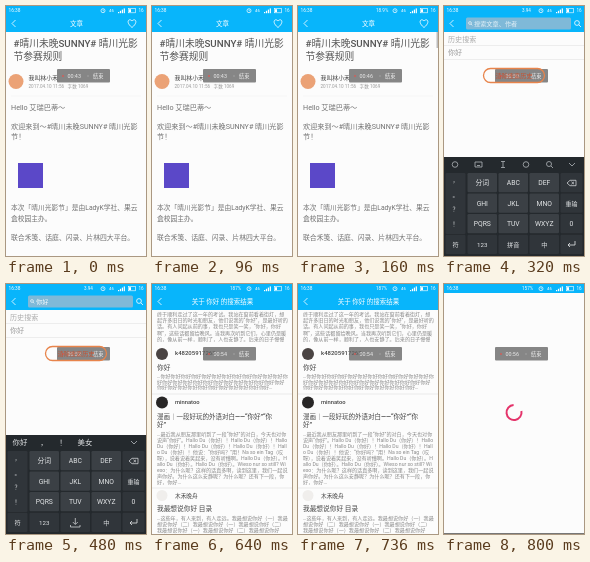
An HTML page that plays this animation: 140x250 px, repeating every 0.96 s.

```html
<!DOCTYPE html>
<html lang="zh-CN">
<meta charset="utf-8">
<title>阅读应用</title>
<style>
html, body { margin: 0; width: 100%; height: 100%; overflow: hidden; background: #fcfcfc; }
svg { display: block; width: 100%; height: 100%; }
text, p { font-family: Roboto, "Noto Sans CJK SC", "Noto Sans CJK", sans-serif; }
text { white-space: pre; }
p { margin: 0; color: #888; word-break: break-all; }
</style>
<svg id="stage" viewBox="0 0 140 250"></svg>
<script>
const STEP = 160;
const BLUE = '#08b5fb';

// y is the vertical middle of the line
const text = (x, y, str, size, fill = '#707070', more = '') =>
  `<text x="${x}" y="${y + size * 0.37}" font-size="${size}" fill="${fill}" ${more}>${str}</text>`;
const mid = (x, y, str, size, fill) => text(x, y, str, size, fill, 'text-anchor="middle"');
const strong = (x, y, str, size, fill = '#444') => text(x, y, str, size, fill, 'font-weight="500"');
const rect = (x, y, w, h, fill, more = '') =>
  `<rect x="${x}" y="${y}" width="${w}" height="${h}" fill="${fill}" ${more}/>`;
const circle = (x, y, r, fill, more = '') =>
  `<circle cx="${x}" cy="${y}" r="${r}" fill="${fill}" ${more}/>`;
const line = (d, color = '#fff', width = 0.8) =>
  `<path d="${d}" fill="none" stroke="${color}" stroke-width="${width}"/>`;
// Wrapped small print; y is the top of the block
const paragraph = (y, rows, pitch, str) =>
  `<foreignObject x="5" y="${y}" width="131" height="${rows * pitch}">
    <p style="font-size:5.1px;line-height:${pitch}px">${str}</p></foreignObject>`;

function statusBar(speed) {
  const bars = [0, 1, 2, 3].map(i => rect(112 + i * 1.9, 6 - i * 1.2, 1.2, 1.2 + i * 1.2, '#fff')).join('');
  return rect(0, 0, 140, 9, BLUE) +
    text(2.5, 4.7, '16:38', 4.8, '#fff') +
    text(78, 4.7, speed, 4.6, '#fff') +
    circle(97, 4.7, 2, 'none', 'stroke="#fff" stroke-width=".7"') + line('M97 3.4V4.8H98', '#fff', 0.5) +
    text(103, 4.7, '46', 4.4, '#fff') + bars +
    rect(122.4, 2.6, 7, 4.2, 'none', 'stroke="#fff" stroke-width=".6"') + rect(123, 3.2, 2, 3, '#fff') +
    text(132.5, 4.7, '16', 4.6, '#fff');
}

const backBar = () => rect(0, 9, 140, 17, BLUE) + line('M9.5 14L6 17.5L9.5 21');
const header = title => backBar() + mid(70.5, 17.3, title, 6.5, '#fff');

function toast(time) {
  return rect(51, 63, 53, 13.5, '#666', 'rx="1" opacity=".78"') +
    circle(57, 70, 0.9, '#d65b55') + text(61.5, 70, time, 5.4, '#eee') +
    line('M82 69V71', '#bbb', 0.5) + text(87, 70, '结束', 5.2, '#eee');
}

function article(time, speed, scrolling) {
  return statusBar(speed) + header('文章') +
    line('M126 21.5C119 16 123 11.5 126 15C129 11.5 133 16 126 21.5Z') +
    strong(7.5, 37, '#晴川未晚SUNNY# 晴川光影', 9.75, '#555') + strong(7.5, 50.7, '节参赛规则', 9.75, '#555') +
    circle(10, 75.5, 7.5, '#eba276') +
    strong(22.5, 72.3, '我叫林小禾', 5.9) +
    text(22.5, 79.8, '2017.04.10 11:56   字数 1069', 4.6, '#999') +
    line('M5 90H135', '#eee', 0.5) +
    text(5, 101, 'Hello 艾瑞巴蒂～', 7.2) +
    text(5, 120, '欢迎来到～#晴川未晚SUNNY# 晴川光影', 7.15) + text(5, 130.5, '节！', 7.15) +
    rect(12, 157, 25, 25, '#5b48c8') +
    text(5, 201.5, '本次「晴川光影节」是由LadyK学社、果云', 6.75) +
    text(5, 212.5, '盒校园主办。', 6.75) +
    text(5, 231.5, '联合禾笺、话庭、闪录、片林四大平台。', 6.85) +
    (scrolling ? rect(138.5, 26, 1.5, 16, '#bbb') : '') +
    toast(time);
}

function keyboard(typed) {
  const key = (x, y, w, h, fill = '#3b4045') => rect(x, y, w, h, fill, 'rx="1.2"');
  const label = (x, y, str, size = 6.8) => mid(x, y, str, size, '#e4e6e8');
  const letters = ['分词', 'ABC', 'DEF', 'GHI', 'JKL', 'MNO', 'PQRS', 'TUV', 'WXYZ'];
  let out = rect(0, 151, 140, 99, '#24292d');

  if (typed) {
    out += [[14, '你好'], [38, '，'], [57, '！'], [79, '美女']].map(([x, s]) => label(x, 158.5, s, 7.4)).join('') +
      line('M125 157L128 160L131 157', '#b8bcc0');
  } else {
    const icon = '#b0b5b9';
    out += circle(11, 158.5, 2.8, 'none', `stroke="${icon}" stroke-width=".8"`) +
      line('M31 156H38V161H31ZM33 159.5H36', icon) +
      line('M59 155.5V161.5M57 155.5H61M57 161.5H61', icon) +
      circle(82, 158.5, 2.8, 'none', `stroke="${icon}" stroke-width=".8"`) +
      circle(105, 158, 2.5, 'none', `stroke="${icon}" stroke-width=".8"`) + line('M107 160L109 162', icon) +
      line('M125 157L128 160L131 157', icon);
  }

  out += key(1.5, 167, 20, 61, '#30353a');
  ['，', '。', '？', '！'].forEach((s, i) => out += label(11.5, 174 + i * 14.5, s, 6));
  letters.forEach((s, i) => {
    const x = 23.5 + i % 3 * 31, y = 167 + Math.floor(i / 3) * 20.5;
    out += key(x, y, 29.5, 19.2) + label(x + 14.8, y + 9.8, s);
  });
  [0, 1, 2].forEach(i => out += key(116.5, 167 + i * 20.5, 22, 19.2, '#30353a'));
  out += line('M123 177L126 174.3H132V179.7H126ZM127.5 175.8L130 178.2M130 175.8L127.5 178.2', '#e4e6e8', 0.7) +
    label(127.5, 197.3, '重输', 6) + label(127.5, 217.8, '0');

  [[1.5, 20, '符'], [23.5, 29.5, '123'], [54.5, 29.5, typed ? '' : '拼音'], [85.5, 29.5, '中'], [116.5, 22, '']]
    .forEach(([x, w, s]) => out += key(x, 228.8, w, 19.2, '#30353a') + label(x + w / 2, 238.6, s, 6.2));
  if (typed) out += line('M69.3 234V240M66.8 238L69.3 240.5L71.8 238M64.5 241V243H74V241', '#e4e6e8', 0.7);
  return out + line('M131 235V239H124M126 237L124 239L126 241', '#e4e6e8');
}

function search(typed, time, speed) {
  return statusBar(speed) + backBar() +
    rect(22, 11.5, 105, 12, '#7fb9d8', 'rx="1.5"') +
    circle(26, 17, 1.4, 'none', 'stroke="#fff" stroke-width=".6"') + line('M27 18L28.3 19.4', '#fff', 0.6) +
    text(30, 17.3, typed ? '你好' : '搜索文章、作者', 6.2, typed ? '#fff' : '#e4f1f8') +
    circle(133, 17, 2.4, 'none', 'stroke="#fff" stroke-width=".8"') + line('M134.8 18.8L137 21') +
    text(4, 33, '历史搜索', 7.1, '#aaa') + line('M0 39.5H140', '#ddd', 0.5) +
    text(4, 46, '你好', 7.1, '#999') + line('M0 53.5H140', '#ddd', 0.5) +
    toast(time) +
    rect(39.5, 62.5, 61, 14, 'none', 'rx="7" stroke="#e8844b" stroke-width="1.3"') +
    strong(51.5, 69.5, '清除搜索历史', 6.2, '#c8502f') +
    keyboard(typed);
}

function results() {
  return statusBar('187%') + header('关于 你好 的搜索结果') +
    paragraph(27, 5, 6.2, '终于顺利走过了这一年的考试。我站在窗前看着街灯，想起许多旧日的时光和朋友，' +
      '他们说我的“你好”，是最好听的话。有人问起从前的事，我也只是笑一笑，“你好，你好啊”，' +
      '这些话都留给晚风。当我再次听到它们，心里仍是暖的，像从前一样，顺利了，人也安静了。' +
      '后来的日子慢慢地过，再见面时，仍然说你好…') +
    circle(10, 70, 6, '#4a4443') + strong(23, 69, 'k48205917263', 6) +
    strong(5, 84, '你好', 6.7) +
    paragraph(90, 3, 5.6, '…' + '你好'.repeat(36) + '…') +
    line('M0 110H140', '#ddd', 0.6) +
    circle(10, 118.5, 6, '#282626') + strong(23, 118, 'minnatoo', 5.8) +
    strong(5, 132.5, '漫画｜一段好玩的外语对白——“你好”“你', 6.5) + strong(5, 141, '好”', 6.5) +
    paragraph(146.5, 9, 6, '…最近我从朋友那里听到了一段“你好”的对白，今天也对你说声“你好”。' +
      'Hallo Du（你好）！'.repeat(6) + '他说：“你好吗？”用！Na so ein Tag（哎呀），' +
      '说着说着笑起来，没有听懂啊。' + 'Hallo Du（你好）。'.repeat(3) +
      'Wieso nur so still? Wieso：为什么呢？这样的话真多啊，读到这里，我们一起说声你好。' +
      '为什么这么安静呢？为什么呢？还有下一段，你好，你好…') +
    line('M0 204H140', '#ddd', 0.6) +
    circle(10, 211.5, 5.5, '#f0eeec') + strong(23, 211.5, '木禾晚舟', 5.7) +
    strong(5, 225, '我最想说你好 目录', 6.7) +
    paragraph(231, 4, 6, '…这些年，有人来到，有人走远。' + '我最想说你好（一）我最想说你好（二）'.repeat(4)) +
    toast('00:54');
}

function loading() {
  return statusBar('157%') + toast('00:56') +
    line('M77.4 127A7.5 7.5 0 1 1 69.6 121', '#e4336a', 2) +
    rect(0, 249, 140, 1, '#777');
}

const scenes = [
  article('00:43', '', false),
  article('00:46', '18.9%', true),
  search(false, '00:50', '3.94'),
  search(true, '00:52', '3.94'),
  results(),
  loading(),
];

const stage = document.getElementById('stage');
stage.innerHTML = scenes.map(s => `<g>${rect(0, 0, 140, 250, '#fcfcfc')}${s}</g>`).join('');
const groups = [...stage.children];

function draw() {
  const current = Math.floor(performance.now() / STEP) % groups.length;
  groups.forEach((g, i) => g.style.display = i === current ? '' : 'none');
  requestAnimationFrame(draw);
}
draw();
</script>
</html>
```
